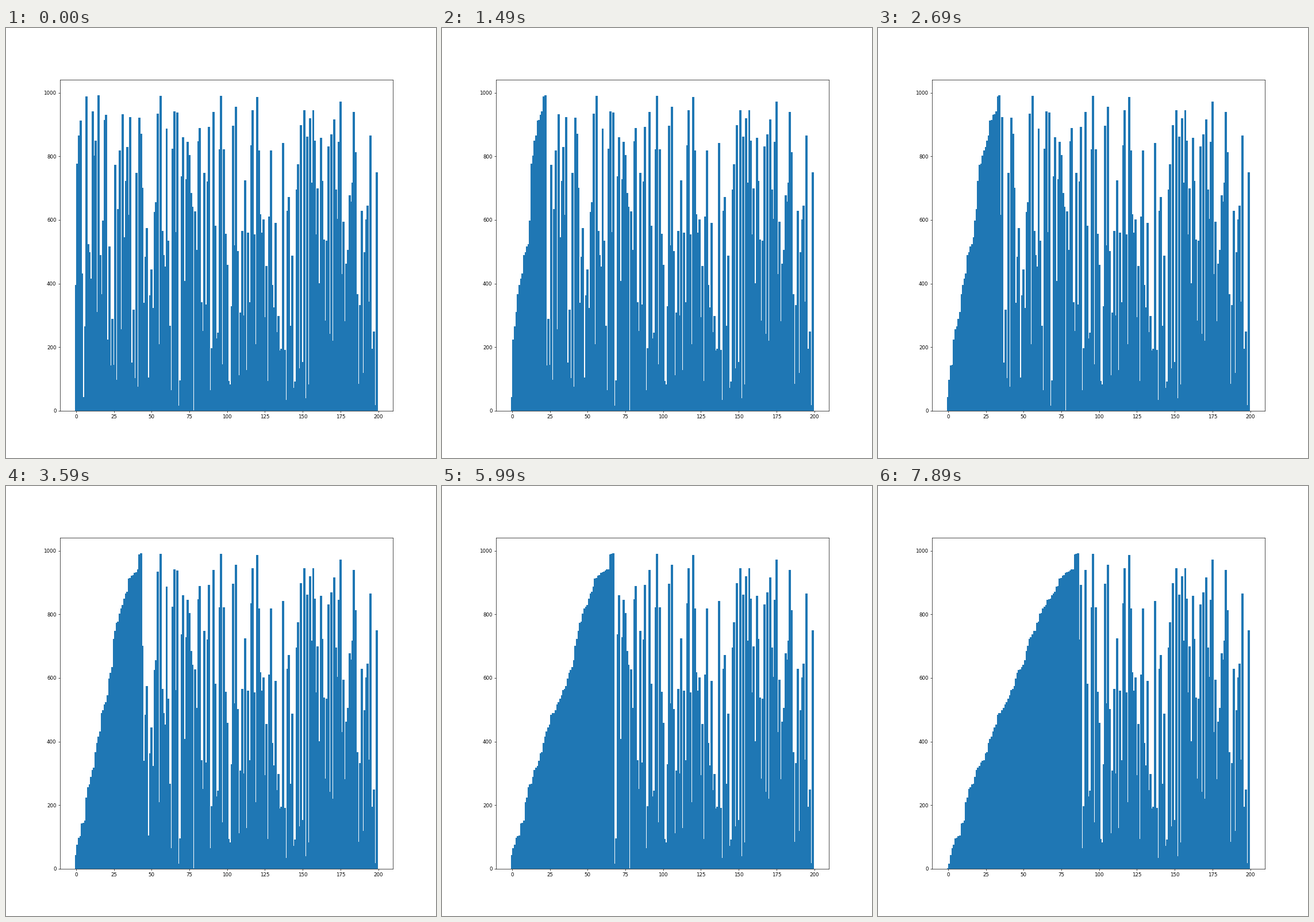
Write a matplotlib script that moves like this. It is 748 by 748 pixels and loops after 7990 ms.

```python
import random

import numpy as np
import matplotlib.pyplot as plt
from matplotlib.animation import FuncAnimation

SIZE = 748
COUNT = 200
WIDTH = 1.5
LOOP = 7990
TICK = 17
FIRST, LAST = 3, 86
STEP, SHORT = 100, 30

random.seed(0)
values = [random.randint(1, 1000) for _ in range(COUNT)]


def insertion_stages():
    """Return (start time, bars) for every insertion that moves something."""
    stages, clock = [], 0
    for k in range(FIRST, LAST + 1):
        bars = sorted(values[:k + 1]) + values[k + 1:]
        if stages and bars == stages[-1][1]:
            # an insertion that moves nothing cuts the pause short
            clock += SHORT - STEP
            continue
        stages.append((clock, bars))
        clock += SHORT if k == FIRST else STEP
    return stages


def outline(bars):
    """Heights of the merged silhouette of the overlapping bars."""
    h = np.asarray(bars)
    out = np.empty(2 * COUNT - 1)
    out[::2] = h
    out[1::2] = np.maximum(h[:-1], h[1:])
    return out


stages = insertion_stages()
starts = [t for t, _ in stages]
shapes = [outline(bars) for _, bars in stages]

half = WIDTH / 2
edges = np.concatenate(([-half], 0.25 + 0.5 * np.arange(2 * COUNT - 2),
                        [COUNT - 1 + half]))

fig = plt.figure(figsize=(12, 12), dpi=SIZE / 12, facecolor="white")
ax = fig.add_subplot()
steps = ax.stairs(shapes[0], edges, fill=True, color="#1f77b4", snap=True)
margin = 0.05 * (COUNT - 1 + WIDTH)
ax.set_xlim(-half - margin, COUNT - 1 + half + margin)
ax.set_ylim(0, 1.05 * max(values))
ax.set_xticks(range(0, 201, 25))
ax.set_yticks(range(0, 1001, 200))


def draw(i):
    now = i * TICK + TICK - 1
    stage = np.searchsorted(starts, now, side="right") - 1
    steps.set_data(values=shapes[stage])
    return (steps,)


anim = FuncAnimation(fig, draw, frames=LOOP // TICK, interval=TICK,
                     repeat=True, repeat_delay=0)
plt.show()
```
